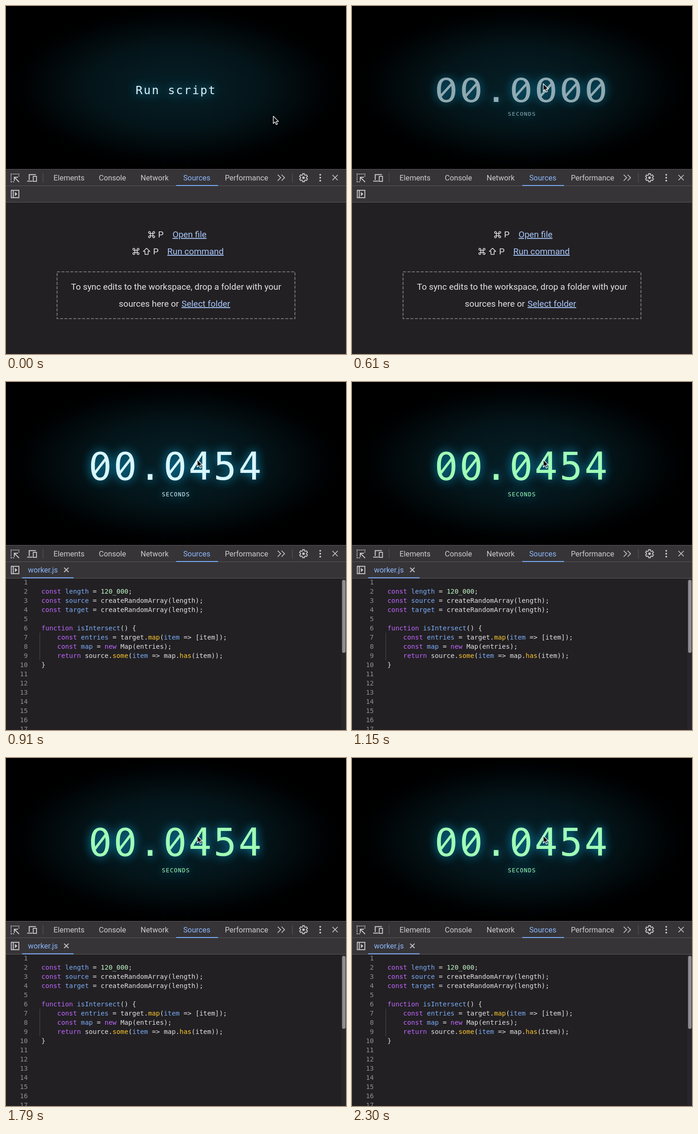
Animation, 739 px wide and 758 px high, one loop 2330 ms. Source, as an HTML page:

```html
<!DOCTYPE html>
<html lang="en">
<head>
<meta charset="utf-8">
<title>Run script</title>
<style>
  html, body { margin: 0; width: 100%; height: 100%; overflow: hidden; background: #000; }
  svg { display: block; width: 739px; height: 758px; }
  text { white-space: pre; }
  .mono { font-family: "DejaVu Sans Mono", monospace; }
  .ui { font-family: Roboto, sans-serif; fill: #e3e1e5; }
  .tab { font-size: 16.3px; fill: #cfcdd1; }
  .big { font-size: 18.93px; }
  .link { fill: #a8c7fa; text-decoration: underline; }
  .tab.on, .on { fill: #8db7fb; }
  .icon { fill: none; stroke: #c9c7cc; stroke-width: 1.9; }
  .solid { fill: #c9c7cc; stroke: none; }
  .code { font-size: 14.26px; fill: #e3e1e5; }
  .num { fill: #918f94; text-anchor: end; }
  .kw { fill: #bf67ff; }
  .def { fill: #7cacf8; }
  .prop { fill: #fcc52c; }
  .lit { fill: #c0f5c8; }
</style>
</head>
<body>
<svg viewBox="0 0 739 758">
  <defs>
    <radialGradient id="halo" gradientUnits="userSpaceOnUse" cx="0" cy="0" r="1"
      gradientTransform="translate(369.5 177.5) scale(365.8 175.7)">
      <stop offset="0" stop-color="#061f27"/>
      <stop offset=".5" stop-color="#04151a"/>
      <stop offset=".92" stop-color="#000102"/>
      <stop offset="1" stop-color="#000"/>
    </radialGradient>
    <filter id="glow" filterUnits="userSpaceOnUse" x="100" y="80" width="540" height="230" color-interpolation-filters="sRGB">
      <feGaussianBlur in="SourceAlpha" stdDeviation="10.4" result="b"/>
      <feFlood flood-color="#0aafe6" flood-opacity=".88"/>
      <feComposite in2="b" operator="in"/>
      <feMerge><feMergeNode/><feMergeNode in="SourceGraphic"/></feMerge>
    </filter>
    <g id="zero">
      <path fill-rule="evenodd" d="M0 -31.6C13 -31.6 19.9 -20.5 19.9 0S13 31.6 0 31.6 -19.9 20.5 -19.9 0 -13 -31.6 0 -31.6Z
        M0 -25.2C-8 -25.2 -11.7 -17 -11.7 0S-8 25.2 0 25.2 11.7 17 11.7 0 8 -25.2 0 -25.2Z"/>
      <path d="M-14.5 14.5L11.5 -19.5 14.5 -14.5 -11.5 19.5Z"/>
    </g>
    <path id="cmd" d="M-2.6 -2.6H2.6V2.6H-2.6ZM-2.6 -2.6H-4.4A2.1 2.1 0 1 1 -2.6 -4.6ZM2.6 -2.6V-4.6A2.1 2.1 0 1 1 4.4 -2.6Z
      M2.6 2.6H4.4A2.1 2.1 0 1 1 2.6 4.6ZM-2.6 2.6V4.6A2.1 2.1 0 1 1 -4.4 2.6Z" fill="none" stroke="#e3e1e5" stroke-width="1.5"/>
  </defs>

  <rect width="739" height="355" fill="url(#halo)"/>
  <g id="button">
    <text id="label" class="mono" x="281.8" y="192" font-size="25" letter-spacing="2.5" filter="url(#glow)">Run script</text>
  </g>
  <g id="timer">
    <g id="digits" filter="url(#glow)"></g>
    <text class="mono" x="338.8" y="249" font-size="12.48" letter-spacing="1.25" filter="url(#glow)">SECONDS</text>
  </g>

  <!-- toolbar -->
  <rect y="355" width="739" height="403" fill="#222023"/>
  <rect y="355" width="739" height="73" fill="#5a585c"/>
  <rect y="356" width="739" height="35" fill="#363437"/>
  <rect y="392" width="739" height="35" fill="#363437"/>
  <path d="M80.5 364V384M622.5 364V384" stroke="#5a585c"/>
  <g class="ui">
    <text x="103.3" y="379.7" class="tab">Elements</text>
    <text x="201.8" y="379.7" class="tab">Console</text>
    <text x="292.6" y="379.7" class="tab">Network</text>
    <text x="385.2" y="379.7" class="tab on">Sources</text>
    <text x="475.7" y="379.7" class="tab">Performance</text>
  </g>
  <rect x="370" y="390" width="91" height="2" fill="#7cacf8"/>
  <g class="icon">
    <path d="M10.5 366H29M11 365V384M28 365V373M10.5 383H19" stroke-dasharray="2.2 1.9"/>
    <path d="M28.5 383.5L18.5 373.5M18 381V373H26"/>
    <path d="M50.5 379V367.2H65M46 381.5H57.5" stroke-width="2.1"/>
    <rect x="59.3" y="371" width="7" height="11"/>
    <path d="M590.5 367.5L597 374 590.5 380.5M599 367.5L605.5 374 599 380.5" stroke-width="1.7"/>
    <path d="M709.5 368L721 379.5M721 368L709.5 379.5" stroke-width="1.7"/>
    <path id="gear" stroke-linejoin="round"/>
    <circle cx="646.7" cy="374" r="2.8" class="solid"/>
    <g class="solid"><circle cx="683" cy="367.6" r="1.9"/><circle cx="683" cy="374" r="1.9"/><circle cx="683" cy="380.4" r="1.9"/></g>
    <path d="M11.5 401.5H28V417.5H11.5ZM15.8 401.5V417.5"/>
    <path d="M19.3 405L24.8 409.5 19.3 414Z" class="solid"/>
  </g>

  <g id="empty">
    <rect x="111" y="579" width="517" height="102" fill="none" stroke="#706e73" stroke-width="2.2" stroke-dasharray="6.4 3.2"/>
    <use href="#cmd" x="316.5" y="498"/>
    <use href="#cmd" x="282.5" y="534.5"/>
    <path d="M305.5 527.5L312.5 534.5H309V541H302V534.5H298.5Z" fill="none" stroke="#e3e1e5" stroke-width="1.5" stroke-linejoin="round"/>
    <g class="ui big">
      <text x="330.5" y="504.3">P</text>
      <text x="319.8" y="541">P</text>
      <text x="361.9" y="504.3" class="link">Open file</text>
      <text x="350.6" y="541" class="link">Run command</text>
      <text x="369.7" y="618.3" text-anchor="middle">To sync edits to the workspace, drop a folder with your</text>
      <text x="375.6" y="655" text-anchor="end">sources here or</text>
      <text x="381.5" y="655" class="link">Select folder</text>
    </g>
  </g>

  <g id="editor">
    <text class="ui tab on" x="47.7" y="415">worker.js</text>
    <path class="icon" d="M126.3 404.3L136 414M136 404.3L126.3 414" stroke-width="1.7"/>
    <rect x="35" y="425.5" width="112" height="2" fill="#7cacf8"/>
    <path d="M73.5 546V606" stroke="#4b494e"/>
    <g id="lines" class="mono code"></g>
    <rect x="729" y="428" width="10" height="330" fill="#28262a"/>
    <rect x="730.5" y="431" width="7.5" height="159" rx="3.7" fill="#8f8d91"/>
  </g>

  <g id="pointer" stroke-linejoin="round">
    <path id="arrow" d="M.5 .5V16.4L4.2 13 6.8 18.8 9.5 17.6 7 11.9H11.8Z" fill="#000" stroke="#fff" stroke-width="1.3"/>
    <g id="hand" transform="translate(1 2)">
      <path d="M-1.8 1.2C-1.6 -.7 1.2 -.7 1.4 1.2L1.7 5.4C2.4 4 4.2 4.3 4.5 5.8 5.2 4.8 6.8 5.2 7 6.5 7.8 5.8 9.2 6.4 9.2 7.8
        9.4 11 8.6 12.4 7.8 14V16.6H.2L-.6 15C-2.2 13.2 -4 11.4 -5.6 9.4 -6.4 8 -4.6 6.6 -3.2 7.8L-1.4 9.6Z" fill="#fff" stroke="#000"/>
      <path d="M2 10V13.5M4.2 10V13.5M6.4 10V13.5" stroke="#000" stroke-width=".9"/>
    </g>
  </g>
</svg>
<script>
const LOOP = 2330, PIVOT = 182.5;
const HOVER = 190, OUT = 310, IN = 460, LOADED = 750, COUNT = 790, DONE = 895;
const RESULT = 0.0454;
const ICE = [218, 246, 255], TEAL = [124, 194, 208], GREEN = [160, 255, 182];
const SOURCE = `
const length = 120_000;
const source = createRandomArray(length);
const target = createRandomArray(length);

function isIntersect() {
    const entries = target.map(item => [item]);
    const map = new Map(entries);
    return source.some(item => map.has(item));
}`.split('\n');

const $ = id => document.getElementById(id);
const set = (id, name, value) => $(id).setAttribute(name, value);
const show = (id, on) => set(id, 'visibility', on ? 'visible' : 'hidden');
const ramp = (t, from, length) => Math.min(1, Math.max(0, (t - from) / length));
const smooth = x => x * x * (3 - 2 * x);
const mix = (a, b, p) => a + (b - a) * p;
const blend = (a, b, p) => `rgb(${a.map((v, i) => Math.round(mix(v, b[i], p)))})`;

function highlight(line) {
  const rule = /\b(const|function|new|return)\b|((?<=const |function )\w+|item(?= =>))|((?<=\.)\w+)|([\d_]+)/g;
  return line.replace(rule, (word, kw, def, prop) =>
    `<tspan class="${kw ? 'kw' : def ? 'def' : prop ? 'prop' : 'lit'}">${word}</tspan>`);
}

function buildEditor() {
  let html = '';
  for (let i = 0; i < 17; i++) {
    const y = 441.3 + i * 19.98;
    html += `<text class="num" x="47.3" y="${y}">${i + 1}</text>`;
    if (SOURCE[i]) html += `<text x="77" y="${y}">${highlight(SOURCE[i])}</text>`;
  }
  $('lines').innerHTML = html;
}

// six teeth, each with two outer and two inner corners
function buildGear() {
  const points = [];
  for (let tooth = 0; tooth < 6; tooth++) {
    for (const [turn, r] of [[-19, 6.6], [-13, 9], [13, 9], [19, 6.6]]) {
      const a = (tooth * 60 + turn - 90) * Math.PI / 180;
      points.push(`${646.7 + r * Math.cos(a)} ${374 + r * Math.sin(a)}`);
    }
  }
  set('gear', 'd', `M${points.join('L')}Z`);
}

let shown = '';
function setDigits(value) {
  const str = value.toFixed(4).padStart(7, '0');
  if (str === shown) return;
  shown = str;
  $('digits').innerHTML = [...str].map((c, i) => {
    const x = 179.7 + i * 54.25;
    return c === '0'
      ? `<use href="#zero" x="${x + 25.1}" y="183"/>`
      : `<text class="mono" font-size="83.2" x="${x}" y="213.4">${c}</text>`;
  }).join('');
}

// p = 0 is edge-on and clear, p = 1 is flat and opaque
function flip(id, p) {
  const s = Math.sin(p * Math.PI / 2);
  show(id, p > 0.01);
  set(id, 'opacity', p);
  set(id, 'transform', `translate(0 ${PIVOT * (1 - s)}) scale(1 ${Math.max(s, 0.01)})`);
}

function draw(t) {
  const move = smooth(ramp(t, 0, 290));
  set('pointer', 'transform', `translate(${mix(580.5, 415.2, move)} ${mix(239.5, 168.8, move)})`);
  const hand = t >= HOVER && t < IN;
  show('hand', hand);
  show('arrow', !hand);

  set('label', 'fill', blend(ICE, TEAL, ramp(t, HOVER, 100)));
  flip('button', 1 - smooth(ramp(t, OUT, IN - OUT)));
  flip('timer', smooth(ramp(t, IN, 250)));
  set('timer', 'fill', blend(ICE, GREEN, smooth(ramp(t, DONE, 220))));
  setDigits(Math.min(RESULT, Math.max(0, (t - COUNT) / 1000)));

  show('empty', t < LOADED);
  show('editor', t >= LOADED);
}

function tick() {
  draw(performance.now() % LOOP);
  requestAnimationFrame(tick);
}

buildEditor();
buildGear();
tick();
</script>
</body>
</html>
```
